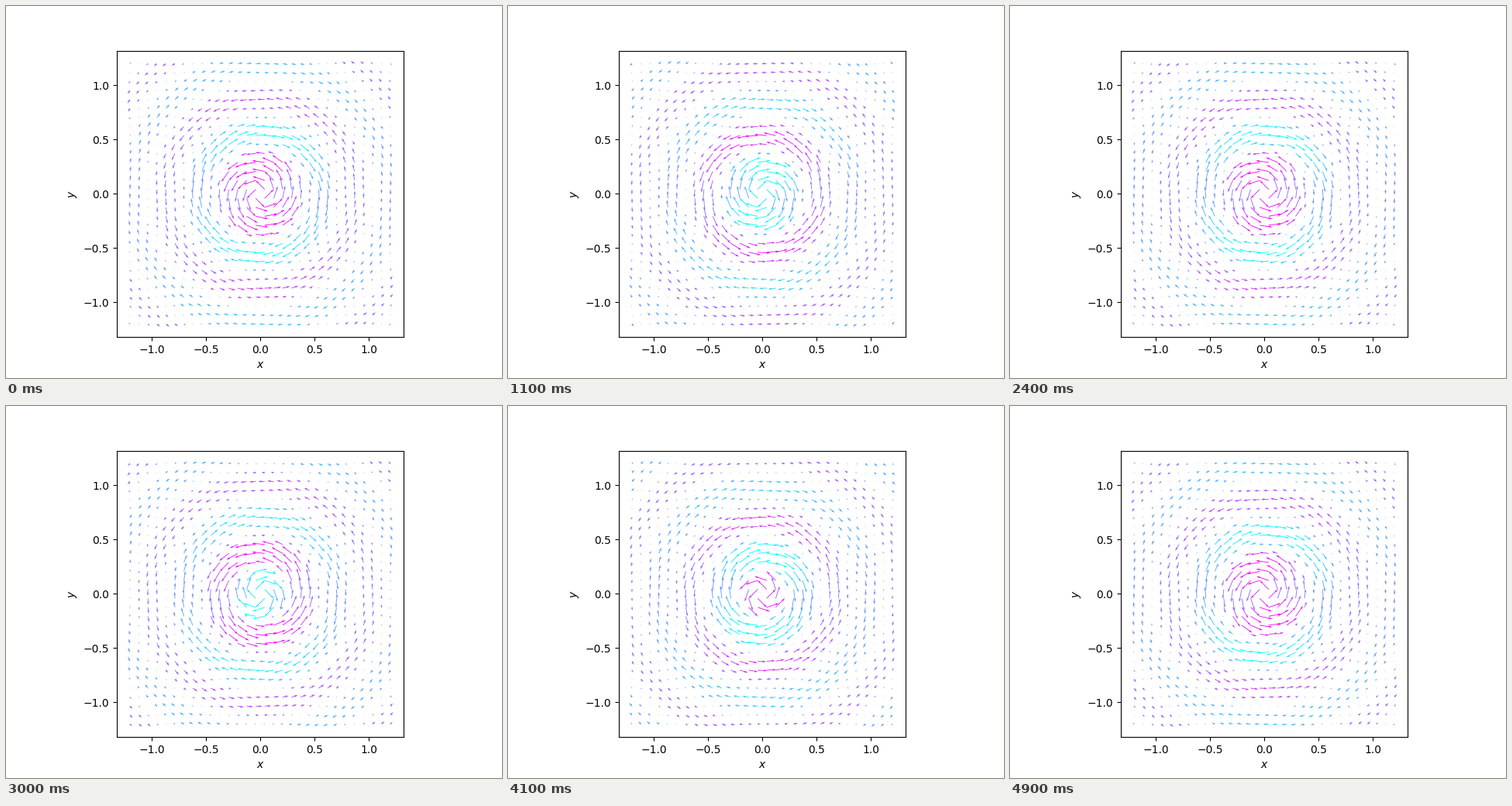
A matplotlib script for the animation above (5 s loop, 640 px wide and 480 px high).

```python
import numpy as np
import matplotlib.pyplot as plt
from matplotlib.animation import FuncAnimation

FRAMES = 50
INTERVAL = 100          # ms
PERIODS = 2             # first and last frame share the same phase
WAVELENGTH = 0.6
LIMIT = 20              # cap on the near field
K = 2 * np.pi / WAVELENGTH

axis = np.linspace(-1.2, 1.2, 30)
X, Y = np.meshgrid(axis, axis)
R = np.hypot(X, Y)
COS, SIN = X / R, Y / R


def field(frame):
    """Azimuthal field of an oscillating dipole: components and colour value."""
    phase = K * R - 2 * np.pi * PERIODS * frame / (FRAMES - 1)
    strength = K**2 * (np.sin(phase) / (K * R)**2 - np.cos(phase) / (K * R))
    strength = np.clip(strength, -LIMIT, LIMIT)
    return -strength * SIN, strength * COS, strength * np.abs(SIN)


fig, ax = plt.subplots(figsize=(6.4, 4.8), dpi=100)
ax.set_aspect("equal")
ax.set_xlabel("$x$")
ax.set_ylabel("$y$")
arrows = ax.quiver(X, Y, *field(0), cmap="cool")
ax.set_xlim(-1.32, 1.32)
ax.set_ylim(-1.32, 1.32)


def update(frame):
    arrows.set_UVC(*field(frame))
    return (arrows,)


fig.canvas.draw()       # fixes the arrow scale from the first state
anim = FuncAnimation(fig, update, frames=FRAMES, interval=INTERVAL,
                     repeat=True, repeat_delay=0)
plt.show()
```
